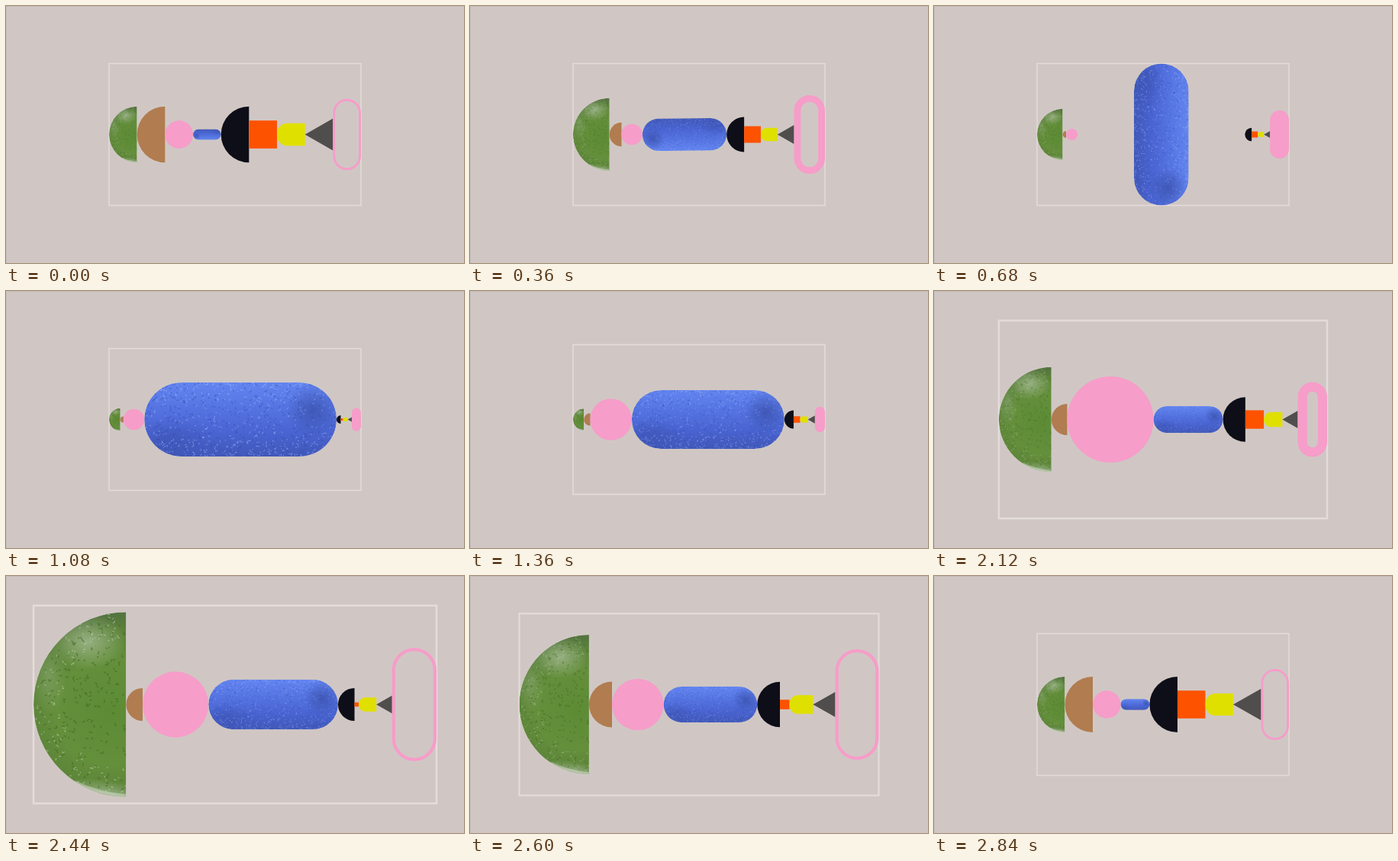
Write an HTML page that moves like this. It is 600 by 337 pixels and loops after 2880 ms.

```html
<!DOCTYPE html>
<html lang="en">
<head>
<meta charset="utf-8">
<title>Shape row</title>
<style>
  html, body { margin: 0; width: 100%; height: 100%; overflow: hidden; background: #d0c7c4; }
  svg { display: block; width: 100%; height: 100%; }
</style>
</head>
<body>
<svg viewBox="0 0 600 337">
  <defs>
    <radialGradient id="leaf" gradientUnits="userSpaceOnUse" cx="32" cy="8" r="104">
      <stop offset="0" stop-color="#5d8b34"/>
      <stop offset=".55" stop-color="#648f3b"/>
      <stop offset=".85" stop-color="#5b8338"/>
      <stop offset="1" stop-color="#55753f"/>
    </radialGradient>
    <radialGradient id="shine">
      <stop offset="0" stop-color="#bccbb2" stop-opacity=".6"/>
      <stop offset="1" stop-color="#bccbb2" stop-opacity="0"/>
    </radialGradient>
    <linearGradient id="skin" x1="0" y1="0" x2="0" y2="1">
      <stop offset="0" stop-color="#6284f0"/>
      <stop offset=".35" stop-color="#5574e2"/>
      <stop offset=".7" stop-color="#4963d0"/>
      <stop offset="1" stop-color="#4058b9"/>
    </linearGradient>
    <radialGradient id="shade">
      <stop offset="0" stop-color="#32479c" stop-opacity=".6"/>
      <stop offset="1" stop-color="#32479c" stop-opacity="0"/>
    </radialGradient>
    <clipPath id="domeClip"><path d="M50-100A100 100 0 0 0 50 100Z"/></clipPath>
    <clipPath id="pillClip"><rect x="-50" y="-19.25" width="100" height="38.5" rx="19.25"/></clipPath>
  </defs>

  <rect width="600" height="337" fill="#d0c7c4"/>
  <path d="M0 .5H600M.5 0V337" stroke="#c4bbb8" fill="none"/>
  <rect id="box" fill="none" stroke="#e4dcda"/>

  <g class="item" clip-path="url(#domeClip)">
    <path d="M50-100A100 100 0 0 0 50 100Z" fill="url(#leaf)"/>
    <ellipse cx="8" cy="-68" rx="42" ry="30" fill="url(#shine)"/>
    <ellipse cx="-34" cy="-30" rx="20" ry="42" fill="url(#shine)" opacity=".45"/>
    <ellipse cx="30" cy="97" rx="55" ry="15" fill="url(#shine)" transform="rotate(10 30 97)"/>
    <path d="M-6 84Q22 97 50 98.5" fill="none" stroke="#dbe2d3" stroke-width="3.5" opacity=".5"/>
    <path id="pores" fill="none" stroke="#3f6824" stroke-width="1.1" stroke-linecap="round" opacity=".62"/>
    <path id="glints" fill="none" stroke="#c3d0b6" stroke-width=".9" stroke-linecap="round" opacity=".6"/>
  </g>
  <path class="item" d="M50-100A100 100 0 0 0 50 100Z" fill="#b17c4f"/>
  <circle class="item" r="50" fill="#f69dc9"/>
  <g class="item" clip-path="url(#pillClip)">
    <rect x="-50" y="-19.25" width="100" height="38.5" rx="19.25" fill="url(#skin)"/>
    <ellipse cx="38" cy="-5" rx="15" ry="14" fill="url(#shade)"/>
    <ellipse cx="-36" cy="10" rx="20" ry="11" fill="url(#shade)" opacity=".55"/>
    <path id="creases" fill="none" stroke="#3349a6" stroke-width=".4" opacity=".5"/>
    <path id="flecks" fill="none" stroke="#a6bbfb" stroke-width=".38" opacity=".6"/>
  </g>
  <path class="item" d="M50-100A100 100 0 0 0 50 100Z" fill="#0d0e17"/>
  <rect class="item" x="-50" y="-50" width="100" height="100" fill="#fd5200"/>
  <path class="item" d="M50-40H-13A37 37 0 0 0-50-3V3A37 37 0 0 0-13 40H50Z" fill="#dfe000"/>
  <path class="item" d="M-50 0L50-57V57Z" fill="#4f4e4c"/>
  <g class="item"><rect id="ring" fill="none" stroke="#f69dc9"/></g>
</svg>
<script>
const LOOP = 2880, CX = 300, CY = 168.5;
const TIMES = [0, 680, 1080, 1640, 2120, 2440, 2840];

// Share of the row for each shape at TIMES, and its height for a width of 1.
const SHAPES = [
  { keys: [1, 4.2, 2.7, 1.06, 3.4, 5.9, 1], ratio: 2 },
  { keys: [1, .55, .75, 1, 1.02, 1.05, 1], ratio: 2 },
  { keys: [1, 1.9, 5, 6.3, 5.6, 4.2, 1], ratio: 1 },
  { keys: [1, 27.3, 46, 8.07, 4.5, 8.25, 1.04], ratio: .385, turns: true },
  { keys: [1, 1.1, 1, 1.7, 1.45, 1.05, 1], ratio: 2 },
  { keys: [1, 1, .55, 1.55, 1.2, .27, 1], ratio: 1 },
  { keys: [1, 1, 1.1, 1.1, 1.2, 1.12, 1], ratio: .8 },
  { keys: [1, 1, 1, 1, 1, 1, 1], ratio: 1.14 },
  { keys: [1, 3.1, 2.2, 1.07, 1.9, 2.83, 1], ratio: 2.55 }
];
const RING_KEYS = [.08, .5, .5, .5, .317, .072, .08];

const $ = id => document.getElementById(id);
const set = (el, attrs) => { for (const k in attrs) el.setAttribute(k, attrs[k]); };
const mix = (a, b, p) => a + (b - a) * p;

function ease(t, from, to) {
  const p = Math.min(1, Math.max(0, (t - from) / (to - from)));
  return p < .5 ? 4 * p ** 3 : 1 - 4 * (1 - p) ** 3;
}

// Looping monotone cubic through the logarithms of the keys.
function track(keys) {
  const n = keys.length, v = keys.map(Math.log);
  const span = i => (i + 1 < n ? TIMES[i + 1] : LOOP) - TIMES[i];
  const rise = v.map((y, i) => (v[(i + 1) % n] - y) / span(i));
  const slope = rise.map((b, i) => {
    const a = rise[(i + n - 1) % n];
    return a * b > 0 ? 2 * a * b / (a + b) : 0;
  });
  return t => {
    let i = n - 1;
    while (TIMES[i] > t) i--;
    const j = (i + 1) % n, d = span(i), p = (t - TIMES[i]) / d, q = 1 - p;
    return Math.exp(v[i] * q * q * (1 + 2 * p) + v[j] * p * p * (3 - 2 * p)
      + d * p * q * (slope[i] * q - slope[j] * p));
  };
}

function random(seed) {
  return () => (seed = seed * 16807 % 2147483647) / 2147483647;
}

// Short curved strokes scattered by place(), which returns a point.
function scatter(id, count, size, seed, place) {
  const r = random(seed);
  let d = '';
  for (let i = 0; i < count; i++) {
    const [x, y] = place(r), a = r() * 6.28, l = size * (.4 + r());
    const dx = Math.cos(a) * l, dy = Math.sin(a) * l, bend = (r() - .5) * 1.2;
    d += `M${x.toFixed(2)} ${y.toFixed(2)}q${(dx / 2 - dy * bend).toFixed(2)} ${(dy / 2 + dx * bend).toFixed(2)} ${dx.toFixed(2)} ${dy.toFixed(2)}`;
  }
  $(id).setAttribute('d', d);
}

const onDome = (near, far) => r => {
  const a = (.5 + r()) * Math.PI, m = 100 * Math.sqrt(mix(near, far, r()));
  return [50 + m * Math.cos(a), m * Math.sin(a)];
};
scatter('pores', 190, 2.3, 71, onDome(0, .9));
scatter('glints', 120, 1.7, 19, onDome(.5, 1));
scatter('creases', 420, 1.3, 37, r => [r() * 100 - 50, r() * 38 - 19]);
scatter('flecks', 520, 1, 53, r => {
  const side = r() < .5 ? -1 : 1;
  return [r() * 100 - 50, side * 19 * (1 - r() ** 1.7)];
});

const items = [...document.querySelectorAll('.item')];
const weights = SHAPES.map(s => track(s.keys));
const ringStroke = track(RING_KEYS);
const box = $('box'), ring = $('ring');

function draw(t) {
  const back = 1 - ease(t, 2420, 2855);
  const grow = ease(t, 1100, 1900) * back;
  const W = mix(330, 528, ease(t, 1845, 2395) * back);
  const H = mix(186, 259.5, grow);
  set(box, {
    x: CX - W / 2, y: CY - H / 2, width: W, height: H,
    'stroke-width': mix(1.5, 2.5, grow)
  });

  const turn = 180 * (1 - ease(t, 298, 1064));
  const shares = weights.map(f => f(t));
  const unit = W / shares.reduce((a, b) => a + b);
  let x = CX - W / 2;

  SHAPES.forEach(({ ratio, turns }, i) => {
    const cell = shares[i] * unit, angle = turns ? turn : 0;
    let bw = 1, bh = ratio;
    if (turns) {
      const a = angle * Math.PI / 180;
      bw = (1 - ratio) * Math.abs(Math.cos(a)) + ratio;
      bh = (1 - ratio) * Math.abs(Math.sin(a)) + ratio;
    }
    const size = Math.min(cell / bw, H / bh);
    set(items[i], {
      transform: `translate(${x + cell / 2} ${CY}) rotate(${angle}) scale(${size / 100})`
    });
    x += cell;
  });

  const s = Math.min(50, 100 * ringStroke(t)), w = 100 - s, h = 255 - s;
  set(ring, { x: -w / 2, y: -h / 2, width: w, height: h, rx: w / 2, 'stroke-width': s });
}

function tick() {
  draw(performance.now() % LOOP);
  requestAnimationFrame(tick);
}
tick();
</script>
</body>
</html>
```
